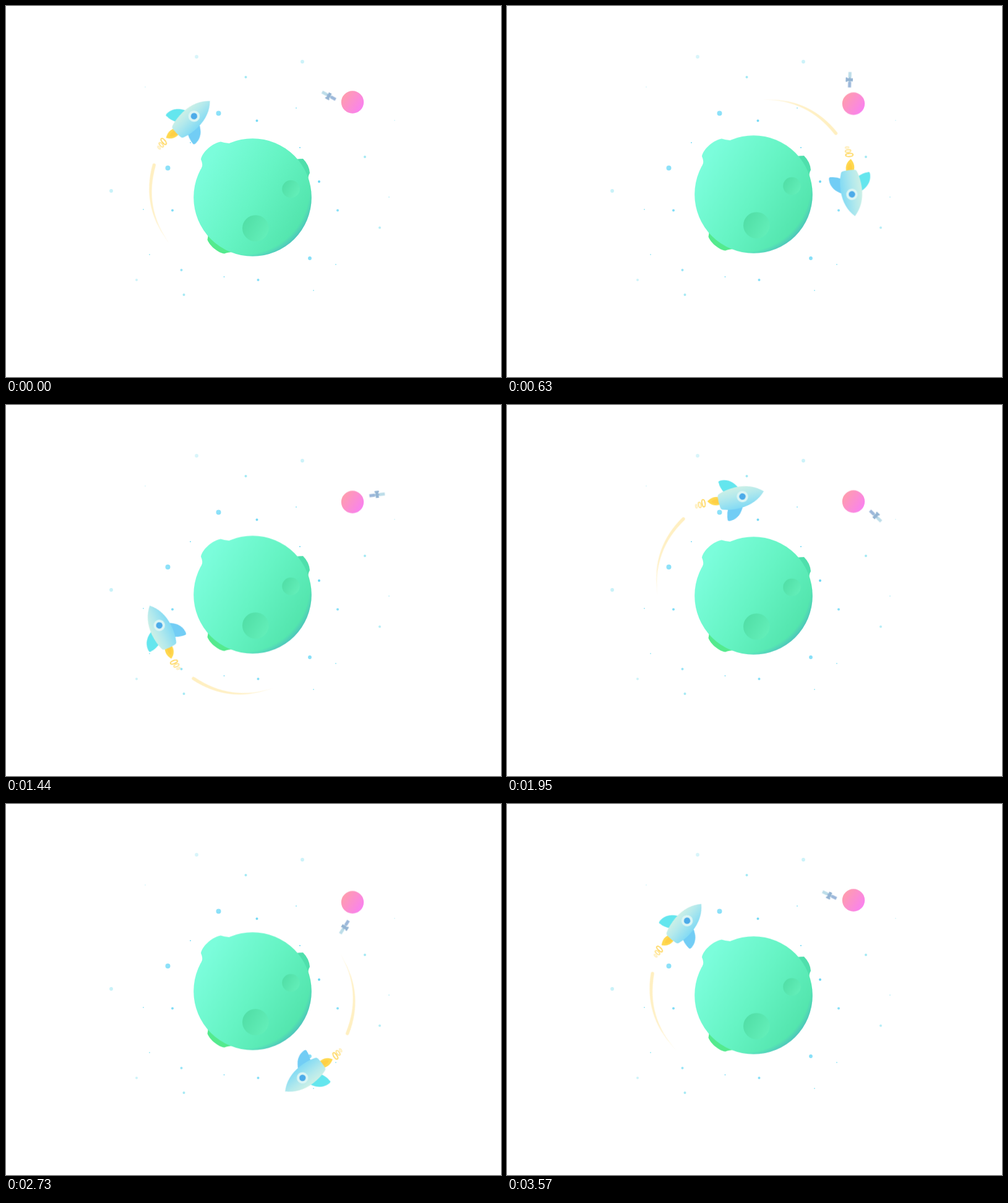
These frames come from a looping animation (800 by 600 pixels, 3.6 s). An HTML page without scripts:

```html
<!DOCTYPE html>
<html lang="en">
<head>
<meta charset="utf-8">
<title>Rocket in orbit</title>
<style>
  html, body { margin: 0; width: 100%; height: 100%; overflow: hidden; background: #fff; }
  svg { display: block; width: 800px; height: 600px; }
  .spin { animation: spin 3.6s linear infinite; }
  .fast { animation-duration: 1.8s; }
  .bob { animation: bob .9s linear infinite alternate; }
  @keyframes spin { to { transform: rotate(360deg); } }
  @keyframes bob { to { transform: translateY(var(--rise)); } }
  .stars { fill: none; stroke: url(#starlight); stroke-linecap: round; }
  .rings { fill: none; stroke: #ffd75e; stroke-width: 1.8; }
</style>
</head>
<body>
<svg viewBox="0 0 800 600">
  <defs>
    <radialGradient id="starlight" gradientUnits="userSpaceOnUse" cx="398" cy="306" r="245">
      <stop offset=".45" stop-color="#6dd7f4"/>
      <stop offset=".6" stop-color="#90e2f9"/>
      <stop offset=".8" stop-color="#a6eaf4"/>
      <stop offset="1" stop-color="#dcf6fb"/>
    </radialGradient>
    <linearGradient id="ground" gradientUnits="userSpaceOnUse" x1="318" y1="265" x2="476" y2="362">
      <stop offset="0" stop-color="#7bfddb"/>
      <stop offset=".5" stop-color="#66f4c4"/>
      <stop offset="1" stop-color="#52e4ac"/>
    </linearGradient>
    <radialGradient id="rim" cx=".42" cy=".42" r=".62">
      <stop offset=".91" stop-color="#4aa8cc" stop-opacity="0"/>
      <stop offset="1" stop-color="#4aa8cc" stop-opacity=".6"/>
    </radialGradient>
    <linearGradient id="crater" x2="1" y2=".6">
      <stop offset="0" stop-color="#4fdca4"/>
      <stop offset="1" stop-color="#62eeb8"/>
    </linearGradient>
    <linearGradient id="moon" y1=".15" x2="1" y2=".85">
      <stop offset="0" stop-color="#ff9fa8"/>
      <stop offset="1" stop-color="#f97ff6"/>
    </linearGradient>
    <linearGradient id="hull" x2="0" y2="1">
      <stop offset="0" stop-color="#cdf0e6"/>
      <stop offset=".4" stop-color="#b3e9ec"/>
      <stop offset="1" stop-color="#82daf4"/>
    </linearGradient>
    <linearGradient id="trail" gradientUnits="userSpaceOnUse" x1="134" y1="-99" x2="15" y2="-154">
      <stop offset="0" stop-color="#ffefc0"/>
      <stop offset=".6" stop-color="#fff1c8"/>
      <stop offset="1" stop-color="#fff1c8" stop-opacity=".3"/>
    </linearGradient>
    <path id="fin" d="M-3-15C-8-26-16-33-27-33.5Q-33-34-32-30Q-32-22-27-13Z"/>
  </defs>

  <g class="stars">
    <path stroke-width="8" d="M343.5 173.5h0M261.5 262h0"/>
    <path stroke-width="5.8" d="M308 82h0M479 90h0M170 299h0M491 408h0"/>
    <path stroke-width="4" d="M387.500 115h0M405.500 185.500h0M580 244h0M506 284h0M269 330.500h0M536 330.500h0M604 358.500h0M283.500 427h0M211 443h0M407.500 443h0M287.500 467h0"/>
    <path stroke-width="2" d="M225 131h0M469 165h0M298 221h0M475 229h0M619 309h0M222 329h0M232 402h0M533 418h0M352.500 438h0M497 460h0M628 185h0"/>
  </g>

  <g class="bob" style="--rise: -7px">
    <path fill="url(#ground)" d="M316 262Q319 257 315 248C317 236 335 221 347 219.500Q352 221 360 222L380 260Z"/>
    <path fill="#4fdfac" d="M468 248Q474 247 480 247Q490 257 491 270Q488 275 488.500 282L460 280Z"/>
    <path fill="#54ea8e" d="M326 368Q327 373 325.500 378C329 388 344 400 353 400.500Q358 398 367 398L370 370Z"/>
    <circle cx="398.5" cy="309.5" r="95.3" fill="url(#ground)"/>
    <circle cx="398.5" cy="309.5" r="95.3" fill="url(#rim)"/>
    <g fill="url(#crater)">
      <circle cx="403.300" cy="359.500" r="21.300"/>
      <circle cx="460.500" cy="296" r="14.300"/>
    </g>
  </g>

  <g class="bob" style="--rise: 3.5px">
    <circle cx="560" cy="155.5" r="18.200" fill="url(#moon)"/>
    <g transform="translate(561 157.200)">
      <g class="spin">
        <!-- satellite -->
        <g transform="rotate(197) translate(41) rotate(-168)">
          <path fill="#bddde9" d="M-12.500-2.500h9v5h-9z"/>
          <path fill="#9db8da" d="M3.500-2.500h9v5h-9z"/>
          <path fill="#a9c9de" d="M-4-1.500h8v3h-8z"/>
          <path fill="#94b4d3" d="M-2.500-5h5v9h1v2.500h-7v-2.500h1z"/>
        </g>
      </g>
    </g>
  </g>

  <g transform="translate(398.5 306) rotate(233.3)">
    <g class="spin fast">
      <path fill="url(#trail)" d="M136-100.600Q90.200-158.200 14.900-154.300Q88-154.800 131.600-97.400A2.700 2.700 0 0 0 136-100.600Z"/>
      <!-- rocket, nose along +x, window at the origin -->
      <g transform="translate(159) rotate(82.650)">
        <g class="rings">
          <ellipse cx="-63.700" cy="-4.500" rx="2.500" ry="6" transform="rotate(4 -63.700 -4.500)"/>
          <ellipse cx="-70.300" cy="-3.300" rx="2" ry="4.500" opacity=".7"/>
          <ellipse cx="-76" cy="-2.500" rx="1.300" ry="3" opacity=".4"/>
        </g>
        <path fill="#ffd84f" d="M-37-8C-46-12-52-9-57-6C-53 1-47 5-37 4Z"/>
        <path fill="#ffc93f" d="M-37-5C-44-7-48-6-51-4C-48 0-44 2-37 2Z" opacity=".6"/>
        <use href="#fin" fill="#64e6ee"/>
        <use href="#fin" fill="#72cdf5" transform="scale(1 -1)"/>
        <path fill="url(#hull)" d="M-36-13C-28-16-18-17.300-8-17.300C10-17 25-11 35.500 0C25 11 10 17 -8 17.300C-18 17.300-28 16-36 13Q-39 12-39 8Q-40 0-39-8Q-39-12-36-13Z"/>
        <circle r="9.200" fill="#dbf5f4"/>
        <circle r="5.200" fill="#4cabe9"/>
      </g>
    </g>
  </g>
</svg>
</body>
</html>
```
